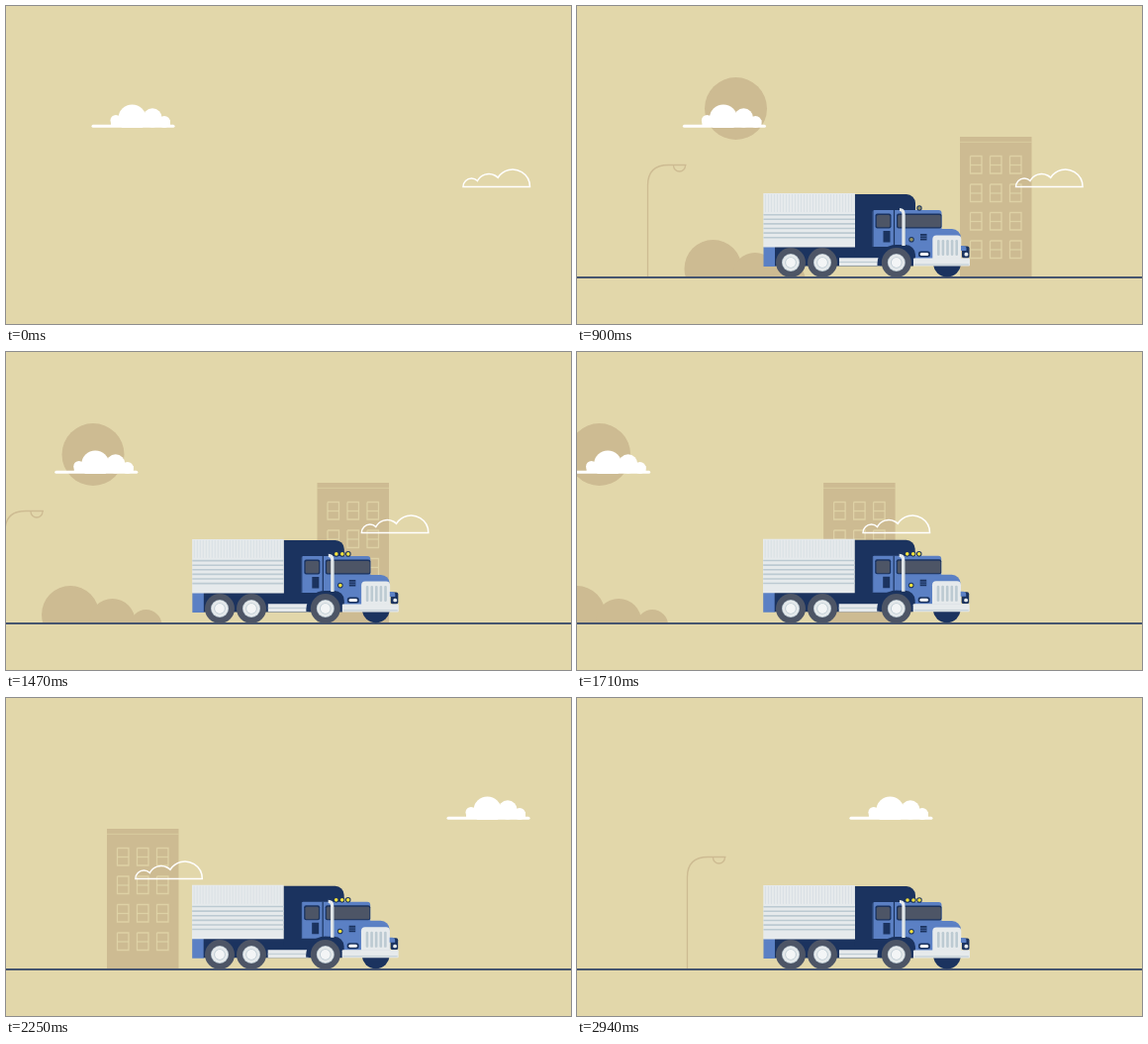
Recreate the animation shown at these times as an HTML page with a canvas. Size 571 by 321 pixels, loop 2970 ms.

```html
<!DOCTYPE html>
<html lang="en">
<head>
<meta charset="utf-8">
<title>Truck on the road</title>
<style>
html, body { margin: 0; width: 100%; height: 100%; overflow: hidden; background: #e2d7aa; }
canvas { display: block; }
</style>
</head>
<body>
<canvas id="stage" width="571" height="321"></canvas>
<script>
const c = document.getElementById('stage').getContext('2d');
const LOOP = 2970, GROUND = 274, TAU = Math.PI * 2;
const SAND = '#e2d7aa', TAN = '#cdbb92', NAVY = '#1b335f', BLUE = '#5b80c4',
      LIGHT = '#e6eaec', STEEL = '#bccad2', DARK = '#4d5566', YELLOW = '#f4e23c';

const part = (t, start, length) => Math.min(1, Math.max(0, (t - start) / length));
const out = p => 1 - (1 - p) ** 3;
const back = p => p ? 1 + 2.7 * (p - 1) ** 3 + 1.7 * (p - 1) ** 2 : 0;

function box(x, y, w, h, color, radius = 0) {
  c.fillStyle = color;
  c.beginPath();
  c.roundRect(x, y, w, h, radius);
  c.fill();
}
function disc(x, y, r, color) {
  c.fillStyle = color;
  c.beginPath();
  c.arc(x, y, Math.max(0, r), 0, TAU);
  c.fill();
}
function line(color, width, ...p) {
  c.strokeStyle = color;
  c.lineWidth = width;
  c.beginPath();
  for (let i = 0; i < p.length; i += 2) c.lineTo(p[i], p[i + 1]);
  c.stroke();
}
// Runs a drawing shifted by x, y and clipped to a rectangle in shifted space.
function group(x, y, clip, draw) {
  c.save();
  c.translate(x, y);
  c.beginPath();
  c.rect(...clip);
  c.clip();
  draw();
  c.restore();
}

function whiteCloud(x) {
  group(x, 0, [-5, 90, 95, 33], () => {
    disc(24, 115.5, 5.5, '#fff');
    disc(40.5, 113.5, 14, '#fff');
    disc(61, 113, 9.7, '#fff');
    disc(73, 117, 6, '#fff');
    box(19, 115, 60, 6, '#fff');
    box(-.5, 119.8, 84, 3, '#fff', 1.5);
  });
}

function outlineCloud(x) {
  c.strokeStyle = '#fff';
  c.lineWidth = 1.5;
  c.beginPath();
  c.arc(x + 8.5, 182.5, 8.5, Math.PI, 5.49);
  c.arc(x + 26, 182.5, 13, 3.624, 5.49);
  c.arc(x + 50, 182.5, 17.5, 3.698, TAU);
  c.closePath();
  c.stroke();
}

function lamp(x, p) {
  if (!p) return;
  c.save();
  c.strokeStyle = TAN;
  c.lineWidth = 1.3;
  c.setLineDash([165 * p, 300]);
  c.beginPath();
  c.moveTo(x, GROUND);
  c.lineTo(x, 181);
  c.quadraticCurveTo(x, 160.5, x + 21, 160.5);
  c.lineTo(x + 39, 160.5);
  c.stroke();
  c.setLineDash([19 * part(p, .8, .2), 40]);
  c.beginPath();
  c.arc(x + 32, 161, 6, 0, Math.PI);
  c.stroke();
  c.restore();
}

function building(x, t) {
  const h = 142 * out(part(t, 368, 400));
  box(x, GROUND - h, 72.5, h, TAN);
  c.globalAlpha = part(t, 680, 80) * .6;
  line(SAND, 1, x, 137.3, x + 72.5, 137.3);
  for (let row = 0; row < 4; row++) for (let col = 0; col < 3; col++) {
    c.globalAlpha = part(t, 760 - row * 35 + col * 15, 80) * .8;
    const wx = x + 10.5 + col * 20, wy = 151.5 + row * 28.5;
    line(SAND, 1.3, wx, wy, wx + 11.5, wy, wx + 11.5, wy + 17.5, wx, wy + 17.5, wx, wy);
    line(SAND, 1.3, wx, wy + 9, wx + 11.5, wy + 9);
  }
  c.globalAlpha = 1;
}

function bushes(x, t) {
  group(x, 0, [-40, 200, 180, GROUND - 200], () =>
    [[0, 265, 29], [42.5, 272, 23], [76.5, 276, 16]].forEach(([bx, by, r], i) =>
      disc(bx, by, r * back(part(t, 620 + i * 50, 220)), TAN)));
}

function cargo(t) {
  const grow = back(part(t, 150, 330));
  c.save();
  c.translate(0, 243.5);
  c.scale(1, grow);
  c.translate(0, -243.5);
  box(188.3, 189, 92.7, 54.5, LIGHT);
  c.globalAlpha = part(t, 480, 150) * .4;
  for (let x = 190.5; x < 281; x += 3) line(STEEL, .7, x, 190, x, 208);
  c.restore();
  [336, 265, 358, 309, 240, 265].forEach((start, i) => {
    const y = 210.7 + i * 4.6;
    line(STEEL, 1.6, 188.5, y, 188.5 + 92.5 * part(t, start, 150), y);
  });
}

function cab(t) {
  // Chassis and sleeper
  box(188.5, 243, 12, 20, BLUE);
  box(200, 243, 140, 19.5, NAVY);
  box(280.5, 190, 61.5, 60, NAVY, [0, 9, 0, 0]);
  box(265, 254.3, 41, 8, LIGHT);
  line(STEEL, 1, 265, 258.5, 306, 258.5);
  // Cab and hood
  box(298.5, 206, 70, 37, BLUE, [2, 3, 0, 0]);
  box(335, 225, 53, 30, BLUE, [0, 9, 0, 0]);
  line(NAVY, 1.2, 320.5, 206, 320.5, 243);
  line(NAVY, 1, 299, 206, 299, 243);
  box(301.5, 209.5, 16, 15, NAVY, 2);
  box(302.8, 211, 13.5, 12.3, DARK, 1.5);
  box(323, 209.5, 45.5, 15, NAVY, 2);
  box(324.2, 211, 43.5, 12.3, DARK, 1.5);
  box(309.5, 227, 7, 11.5, NAVY);
  box(347, 230, 6.5, 6.5, NAVY);
  line(BLUE, .6, 347, 232.2, 353.5, 232.2);
  line(BLUE, .6, 347, 234.4, 353.5, 234.4);
  // Fender arch
  group(0, 0, [300, 235, 46, 27], () => {
    disc(322.5, 260, 19, NAVY);
    box(322, 241, 20, 20, NAVY, [0, 10, 0, 0]);
  });
  // Grille, lamps, bumper
  box(359.3, 231.5, 29, 23.5, LIGHT, [4, 4, 0, 0]);
  for (let x = 364; x < 386; x += 4.6)
    box(x, 236, 2.6, 16, STEEL, 1.2);
  box(389, 242.5, 7.5, 12, NAVY, 2);
  box(391.5, 248.8, 3.8, 3.6, LIGHT, 1.5);
  box(388, 242, 5.5, 5, BLUE, [0, 3, 0, 0]);
  box(345, 247.5, 12, 6, NAVY, 2.5);
  box(346.7, 249, 8.6, 3, '#fff', 1.5);
  group(0, 0, [355, 262, 40, 14], () => disc(374, 259.5, 14, NAVY));
  box(340, 254.5, 57, 8, LIGHT, 1);
  line(STEEL, 1, 341, 261, 396, 261);
  // Exhaust
  c.strokeStyle = LIGHT;
  c.lineWidth = 3.2;
  c.beginPath();
  c.moveTo(326, 205.5);
  c.quadraticCurveTo(330, 205.5, 330, 210);
  c.lineTo(330, 242);
  c.stroke();
  line(STEEL, .8, 331.2, 211, 331.2, 242);
}

function truck(t) {
  const shake = t > 1205 ? -.4 - .4 * Math.sin(t / 60) : 0;
  const reveal = 211 * out(part(t, 430, 330));
  group(shake, shake / 2, [188, 180, reveal, 100], () => cab(t));
  group(shake, shake / 2, [180, 170, 110, 80], () => cargo(t));
  const glow = t < 1150 ? '#96935f' : YELLOW;
  [[346, 204, 850], [340, 204, 910], [334, 204, 970], [338, 235.7, 780]].forEach(([x, y, start]) => {
    const s = out(part(t, start, 80));
    disc(x + shake, y + shake / 2, 2.8 * s, NAVY);
    disc(x + shake, y + shake / 2, 1.8 * s, glow);
  });
  [216, 248, 322.8].forEach((x, i) => {
    const s = back(part(t, 560 + i * 50, 220));
    disc(x, 259, 15 * s, DARK);
    disc(x, 259, 9 * s, STEEL);
    disc(x, 259, 8.2 * s, LIGHT);
    disc(x, 259, 5.8 * s, STEEL);
    disc(x, 259, 4.9 * s, '#f3f5f6');
  });
}

function draw(t) {
  const scroll = .2725 * Math.max(0, t - 1205);
  const drift = .026 * Math.max(0, t - 115);
  box(0, 0, 571, 321, SAND);
  disc(160.5 - scroll, 103.5, 31.5 * back(part(t, 60, 280)), TAN);
  lamp(71.5 - scroll, out(part(t, 60, 320)));
  lamp(584.5 - scroll, out(part(t, 2600, 280)));
  building(387 - scroll, t);
  bushes(137.5 - scroll, t);
  whiteCloud(87 + drift - scroll);
  whiteCloud(675.5 + drift - scroll);
  outlineCloud(462 - .0205 * t - scroll);
  line('#46556f', 2, 0, GROUND, 571 * out(part(t, 20, 320)), GROUND);
  truck(t);
}

const begin = performance.now();
function tick() {
  draw((performance.now() - begin) % LOOP);
  requestAnimationFrame(tick);
}
tick();
</script>
</body>
</html>
```
